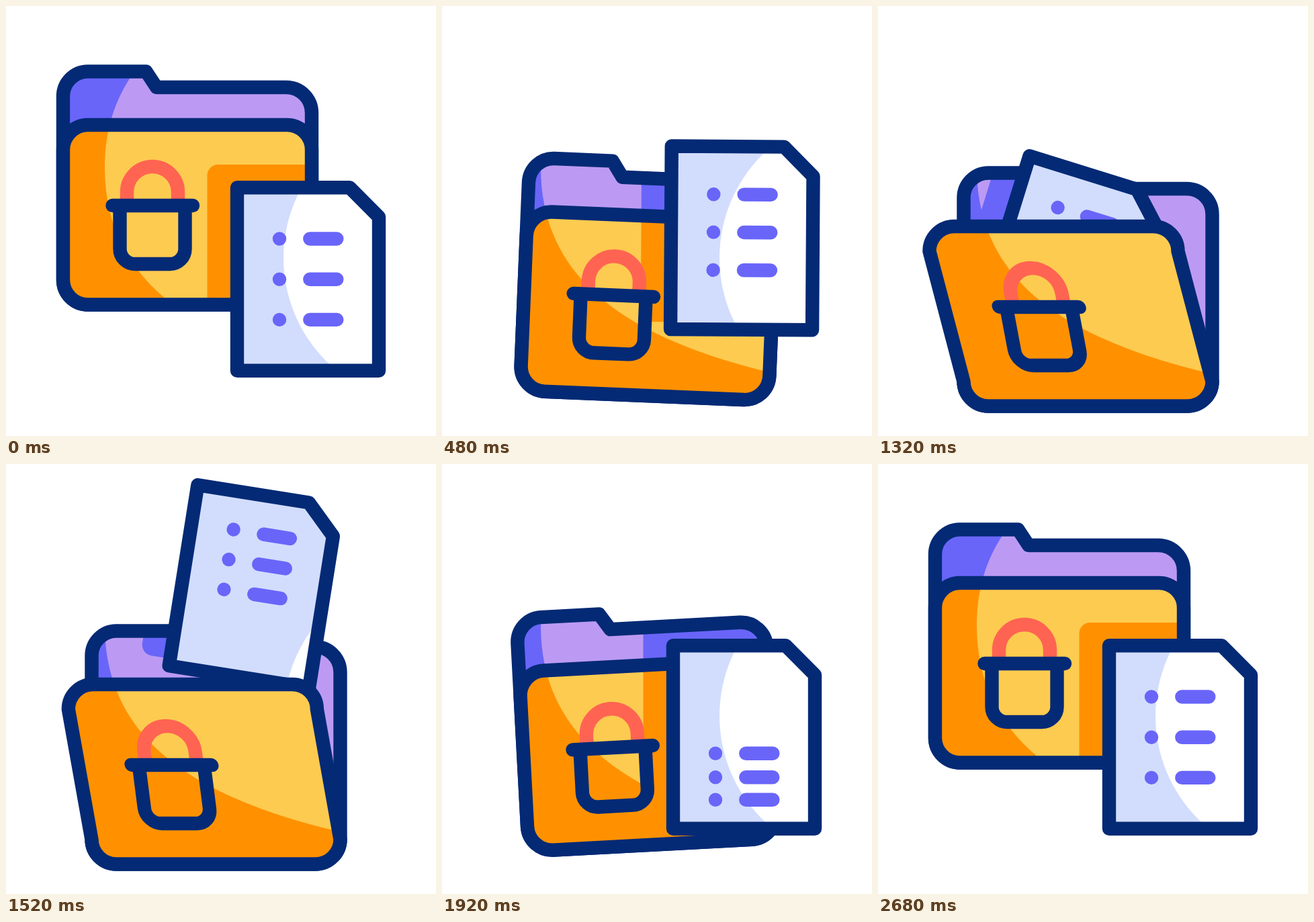
Write an HTML page with a canvas that moves like this. It is 640 px wide and 640 px high and loops after 3000 ms.

```html
<!DOCTYPE html>
<html lang="en">
<head>
<meta charset="utf-8">
<title>Folder and document</title>
<style>
  html, body { margin: 0; width: 100%; height: 100%; overflow: hidden; background: #fff; }
  canvas { display: block; width: 640px; height: 640px; }
</style>
</head>
<body>
<canvas id="stage" width="640" height="640"></canvas>
<script>
const ctx = document.getElementById('stage').getContext('2d');
const LOOP = 3000;
const INK = '#042a75', BLUE = '#6965f9', LILAC = '#bc9af3', ORANGE = '#ff9100',
      YELLOW = '#fdcb50', RED = '#ff6452', SHEET = '#d2ddfd';

const backPath = new Path2D('M121.5 97.5H208.5L224 121H417A38 38 0 0 1 455 159V408A37 37 0 0 1 418 444.5H121.5A37 37 0 0 1 85 408V134A37 37 0 0 1 121.5 97.5Z');
const sheetPath = new Path2D('M344 270.3H511.5L555 314V542.7H344Z');
const shackle = new Path2D('M180 297V277A38 38 0 0 1 256 277V297');
const lockBody = new Path2D('M169.5 297V361.5A22.5 22.5 0 0 0 192 384H244A22.5 22.5 0 0 0 266.5 361.5V297');
const lockRim = new Path2D('M158.5 297H278');
const castShadow = new Path2D();
castShadow.roundRect(299.5, 236, 231, 296, 16);

// These light edges stay fixed on the stage while the objects move through them.
const folderShade = new Path2D('M215 70C165 120 147 180 147 240C147 402 268 492 487 545L640 580V640H0V0H215Z');
const sheetLight = new Path2D();
sheetLight.arc(630, 375, 217, 0, 7);

// Eased value at time t from a flat list of time, value pairs.
function key(t, ...k) {
  if (t <= k[0]) return k[1];
  for (let i = 2; i < k.length; i += 2) {
    if (t < k[i]) {
      const u = (t - k[i - 2]) / (k[i] - k[i - 2]);
      return k[i - 1] + (k[i + 1] - k[i - 1]) * u * u * (3 - 2 * u);
    }
  }
  return k[k.length - 1];
}

function frontPath(lean) {
  return new Path2D(`M${121.5 - lean} 177H${418 - lean}A37 37 0 0 1 ${455 - lean} 214L455 408A37 37 0 0 1 418 444.5H121.5A37 37 0 0 1 85 408L${85 - lean} 214A37 37 0 0 1 ${121.5 - lean} 177Z`);
}

function place({ x, y, turn, cx, cy }) {
  ctx.setTransform(1, 0, 0, 1, x, y);
  ctx.rotate(turn * Math.PI / 180);
  ctx.translate(-cx, -cy);
}

function fill(path, color) {
  ctx.fillStyle = color;
  ctx.fill(path);
}

function stroke(path, color = INK, cap = 'round') {
  ctx.strokeStyle = color;
  ctx.lineCap = cap;
  ctx.stroke(path);
}

function folderPose(t) {
  const drop = key(t, 133, 0, 567, 1, 1640, 1, 2650, 0);
  return {
    x: 270 + 42.5 * drop, y: 271 + 151 * drop, cx: 270, cy: 271,
    turn: key(t, 133, 0, 365, 6.1, 567, 0, 1640, 0, 2200, -6.1, 2667, 0)
  };
}

function sheetPose(t) {
  const lift = key(t, 386, 0, 680, 1, 1634, 1, 1870, 0);
  const dip = key(t, 680, 0, 1000, 1, 1300, 1, 1634, 0);
  return {
    x: 449.5 - 51 * lift ** 2 - 114 * dip,
    y: 406.5 - 248.5 * lift + 231 * dip ** 1.7,
    turn: 6 * lift ** 2 + 11.4 * dip + key(t, 1634, 0, 1810, -3.4, 1910, 0),
    cx: 449.5, cy: 406.5
  };
}

function drawPanel(path, light, dark, folder, sheet, shadowed) {
  ctx.save();
  place(folder);
  ctx.clip(path);
  fill(path, light);
  ctx.resetTransform();
  fill(folderShade, dark);
  if (shadowed) {
    place(sheet);
    fill(castShadow, dark);
  }
  ctx.restore();
  place(folder);
  stroke(path);
}

function drawLock(lean) {
  const skew = 0.72 * lean / 195;
  ctx.transform(1, 0, skew, 1, -409 * skew, 0);
  stroke(shackle, RED, 'butt');
  stroke(lockBody, INK, 'butt');
  stroke(lockRim);
}

function drawSheet(t, pose) {
  ctx.save();
  place(pose);
  ctx.clip(sheetPath);
  fill(sheetPath, SHEET);
  ctx.resetTransform();
  fill(sheetLight, '#fff');
  ctx.restore();
  place(pose);
  stroke(sheetPath);

  // Rows bunch towards the top as the sheet rises and the bottom as it lands.
  const squeeze = key(t, 386, 0, 680, 0.26, 840, 0.22, 1000, 0.2, 1300, 0.2, 1520, 0.25, 1634, 0.26, 1890, 0);
  const landing = [[85, 2367], [60, 2440], [33, 2520]];
  landing.forEach(([fall, end], i) => {
    const rest = 76.2 + 60.2 * i;
    const y = 270.3 + rest * (1 - squeeze) + key(t, 1650, 0, 1895, fall, end, 0);
    stroke(new Path2D(`M407 ${y}h.01M452.3 ${y}h40`), BLUE);
  });
}

function draw(t) {
  const folder = folderPose(t), sheet = sheetPose(t);
  const lean = key(t, 680, 0, 1000, 51, 1400, 51, 1720, 0);
  const inside = t >= 680 && t < 1634;

  ctx.resetTransform();
  ctx.fillStyle = '#fff';
  ctx.fillRect(0, 0, 640, 640);
  ctx.lineWidth = 20.4;
  ctx.lineJoin = 'round';

  drawPanel(backPath, LILAC, BLUE, folder, sheet, true);
  if (inside) drawSheet(t, sheet);
  drawPanel(frontPath(lean), YELLOW, ORANGE, folder, sheet, !inside);
  drawLock(lean);
  if (!inside) drawSheet(t, sheet);
}

const start = performance.now();
function tick() {
  draw((performance.now() - start) % LOOP);
  requestAnimationFrame(tick);
}
tick();
</script>
</body>
</html>
```
